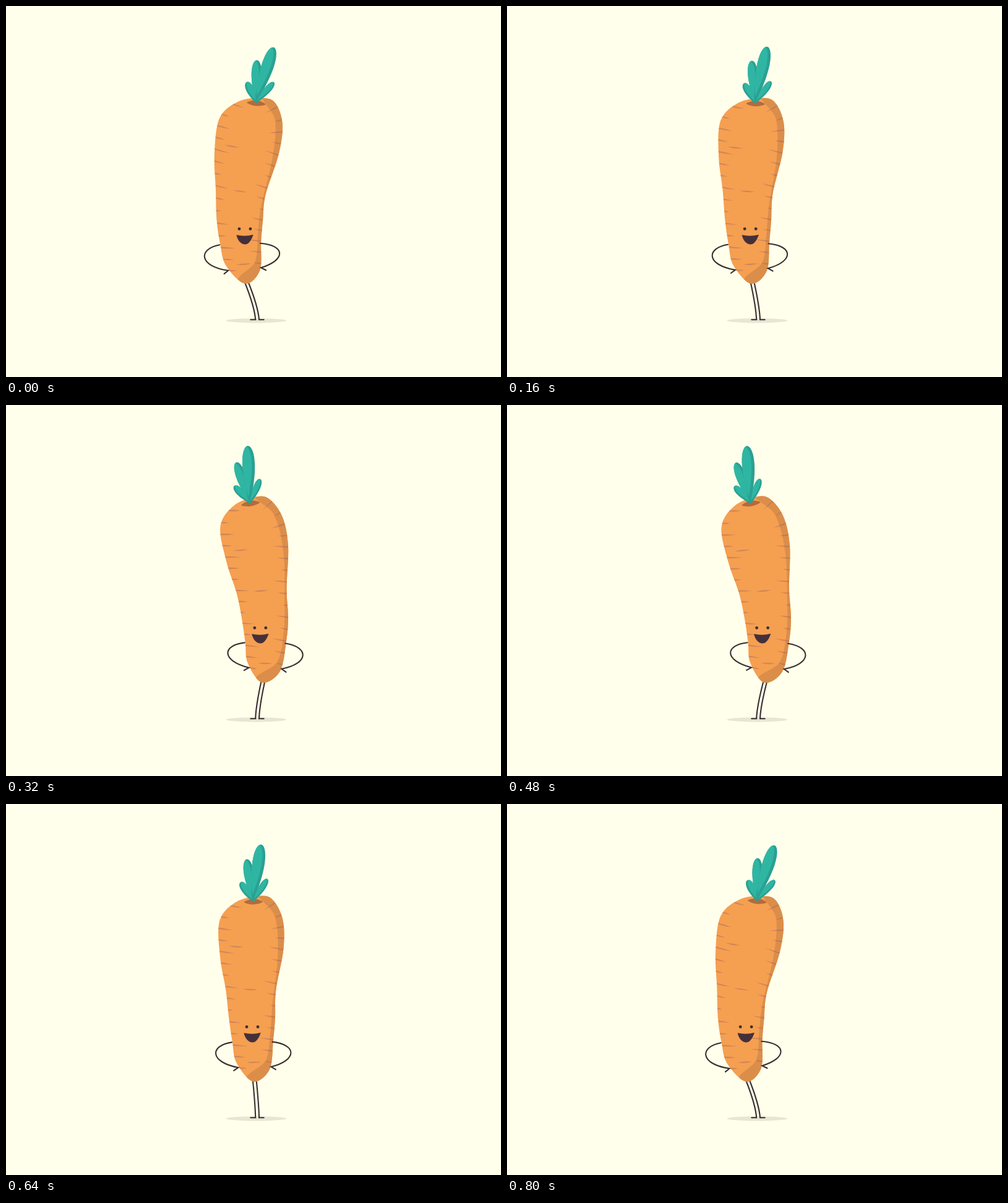
Animation, 800 px wide and 600 px high, one loop 840 ms. Source, as an HTML page with a canvas:

```html
<!DOCTYPE html>
<html lang="en">
<head>
<meta charset="utf-8">
<title>Swaying carrot</title>
<style>
html, body { margin: 0; height: 100%; overflow: hidden; background: #ffffeb; }
canvas { display: block; }
</style>
</head>
<body>
<canvas id="stage" width="800" height="600"></canvas>
<script>
const ctx = document.getElementById('stage').getContext('2d');
const LOOP = 840, STEP = 40, AXIS = 406;
const INK = '#39302e';

// Key points of the upright pose; smooth curves run through them.
const body = [[405, 149], [370, 160.5], [345.5, 192], [350, 250], [362, 302], [368.5, 347], [374, 385],
  [379.5, 418], [405, 449], [432.5, 430], [440, 383], [443.2, 345], [443, 300], [451.5, 232], [447, 184], [428, 153]];
const shade = [[408, 146], [434, 180], [443, 240], [438.5, 320], [435.5, 370], [427, 415], [396, 446], [480, 470], [480, 140]];
const socket = [[383, 160], [398, 154], [413, 158], [398, 163]];

// 0 = leaning left, 1 = leaning right, with a soft pause at both ends.
function sway(time) {
  const x = Math.max(0, 1 - Math.abs(time / (LOOP / 2) - 1) - 0.007);
  return x * x / (x * x + (1 - x) * (1 - x));
}

// Returns the map that bows the carrot: each row slides sideways and tilts.
function bender(k) {
  return ([x, y]) => {
    const d = y - 362;
    const shift = 44.6 - 0.39 * (Math.hypot(d, 78) - 78);
    const angle = -0.28 * Math.tanh(d / 60) * k * (d > 0 ? 0.6 : 1);
    return [
      AXIS + k * shift + (x - AXIS) * Math.cos(angle),
      y - (x - AXIS) * Math.sin(angle) + Math.max(0, 150 - y) * 0.05 * k * k
    ];
  };
}

// Closed smooth curve through the points.
function blob(points, bend) {
  const p = points.map(bend), n = p.length, path = new Path2D();
  path.moveTo(...p[0]);
  for (let i = 0; i < n; i++) {
    const a = p[(i + n - 1) % n], b = p[i], c = p[(i + 1) % n], d = p[(i + 2) % n];
    path.bezierCurveTo(b[0] + (c[0] - a[0]) / 6, b[1] + (c[1] - a[1]) / 6,
      c[0] - (d[0] - b[0]) / 6, c[1] - (d[1] - b[1]) / 6, ...c);
  }
  path.closePath();
  return path;
}

function fill(path, color) {
  ctx.fillStyle = color;
  ctx.fill(path);
}

// Fills a shape, then a second one inside it.
function fillInside(outer, outerColor, paintInside) {
  fill(outer, outerColor);
  ctx.save();
  ctx.clip(outer);
  paintInside();
  ctx.restore();
}

// x of the body outline at height y; side is -1 (left) or 1 (right).
function edgeX(y, side) {
  for (let i = 0; i < body.length; i++) {
    const [ax, ay] = body[i], [bx, by] = body[(i + 1) % body.length];
    if ((ay - y) * (by - y) <= 0 && side * (ax + bx - 2 * AXIS) > 0) return ax + (bx - ax) * (y - ay) / (by - ay);
  }
}

// Thin lens between two points.
function stripe(from, to, bend) {
  const a = bend(from), b = bend(to);
  const mx = (a[0] + b[0]) / 2, my = (a[1] + b[1]) / 2;
  ctx.beginPath();
  ctx.moveTo(...a);
  ctx.quadraticCurveTo(mx, my - 1.6, ...b);
  ctx.quadraticCurveTo(mx, my + 3, ...a);
  ctx.fill();
}

// Edge stripes start outside the outline, so the clip turns them into wedges.
function stripes(bend) {
  ctx.fillStyle = 'rgba(150, 92, 98, 0.4)';
  for (const side of [-1, 1]) {
    for (let i = 0; i < 15; i++) {
      const y = (side < 0 ? 167 : 159) + 18.5 * i;
      const length = 7 + 18 * ((i * 0.618 + 0.5) % 1);
      const slope = side < 0 ? 0.1 : Math.max(-0.15, (215 - y) / 75);
      const x = edgeX(y, side), dx = -side * length, dy = slope * length;
      stripe([x - dx * 0.7, y - dy * 0.7], [x + dx, y + dy], bend);
    }
  }
  for (const [x, y] of [[374.5, 232], [401.5, 300], [408, 417.5]]) stripe([x - 12, y], [x + 12, y], bend);
}

// Teardrop from the crown to a tip; offset slides it sideways.
function teardrop(tipX, tipY, width, offset) {
  const baseX = 397.5, baseY = 159, dx = tipX - baseX, dy = tipY - baseY, length = Math.hypot(dx, dy);
  return Array.from({ length: 16 }, (_, i) => {
    const t = i / 8 * Math.PI;
    const along = (1 - Math.cos(t)) / 2;
    const across = (1.35 * width * Math.sin(t) * Math.abs(Math.sin(t / 2)) ** 1.2 + offset) / length;
    return [baseX + dx * along - dy * across, baseY + dy * along + dx * across];
  });
}

function leaf(tipX, tipY, width, shadeSide, bend) {
  fillInside(blob(teardrop(tipX, tipY, width, 0), bend), '#2ba093', () =>
    fill(blob(teardrop(tipX, tipY, width, -shadeSide * width * 0.5), bend), '#2fb6a3'));
}

function arm(shoulder, elbow, hand, bend) {
  const finger = hand + Math.sign(elbow - hand) * 7.4;
  const [a, b, c, d, e] = [[shoulder, 385], [elbow, 390], [elbow, 416], [hand, 425.7], [finger, 430.4]].map(bend);
  ctx.beginPath();
  ctx.moveTo(...a);
  ctx.bezierCurveTo(...b, ...c, ...d);
  ctx.lineTo(...e);
  ctx.stroke();
}

function leg(foot, toe, lean) {
  ctx.beginPath();
  ctx.moveTo(foot + 1 + lean, 446);
  ctx.quadraticCurveTo(foot + lean * 0.07, 487, foot, 507.3);
  ctx.lineTo(toe, 507.3);
  ctx.stroke();
}

function face(dx) {
  ctx.fillStyle = INK;
  for (const x of [394, 412]) {
    ctx.beginPath();
    ctx.arc(x + dx, 360.4, 2.4, 0, 7);
    ctx.fill();
  }
  ctx.fillStyle = '#45303a';
  ctx.beginPath();
  ctx.moveTo(389.5 + dx, 370.3);
  ctx.quadraticCurveTo(403 + dx, 373.5, 416.7 + dx, 369.8);
  ctx.bezierCurveTo(414 + dx, 379, 409 + dx, 385.6, 403.5 + dx, 385.6);
  ctx.bezierCurveTo(397 + dx, 385.6, 391 + dx, 379, 389.5 + dx, 370.3);
  ctx.fill();
}

function draw(time) {
  const lean = sway(time) - 0.62, bend = bender(lean / 0.97);
  ctx.fillStyle = '#ffffeb';
  ctx.fillRect(0, 0, 800, 600);

  ctx.fillStyle = '#e6e6d4';
  ctx.beginPath();
  ctx.ellipse(404.5, 508.8, 49, 3.6, 0, 0, 7);
  ctx.fill();

  ctx.strokeStyle = INK;
  ctx.lineWidth = 2.1;
  ctx.lineCap = 'round';
  leg(403.2, 395.3, 30 * lean);
  leg(409, 416.7, 30 * lean);

  fillInside(blob(body, bend), '#f59f51', () => {
    fill(blob(shade, bend), '#db8e4a');
    stripes(bend);
  });
  fill(blob(socket, bend), '#b06c3e');

  leaf(382.5, 90.5, 8, 1, bend);
  leaf(404, 65.5, 10, 1, bend);
  leaf(375, 128, 6, -1, bend);
  leaf(418, 120.5, 5.5, 1, bend);

  face(27.5 * lean);
  arm(373, 336.4, 382, bend);
  arm(438.5, 478.3, 435, bend);
}

function tick(now) {
  draw(Math.floor(now % LOOP / STEP) * STEP);
  requestAnimationFrame(tick);
}
tick(0);
</script>
</body>
</html>
```
